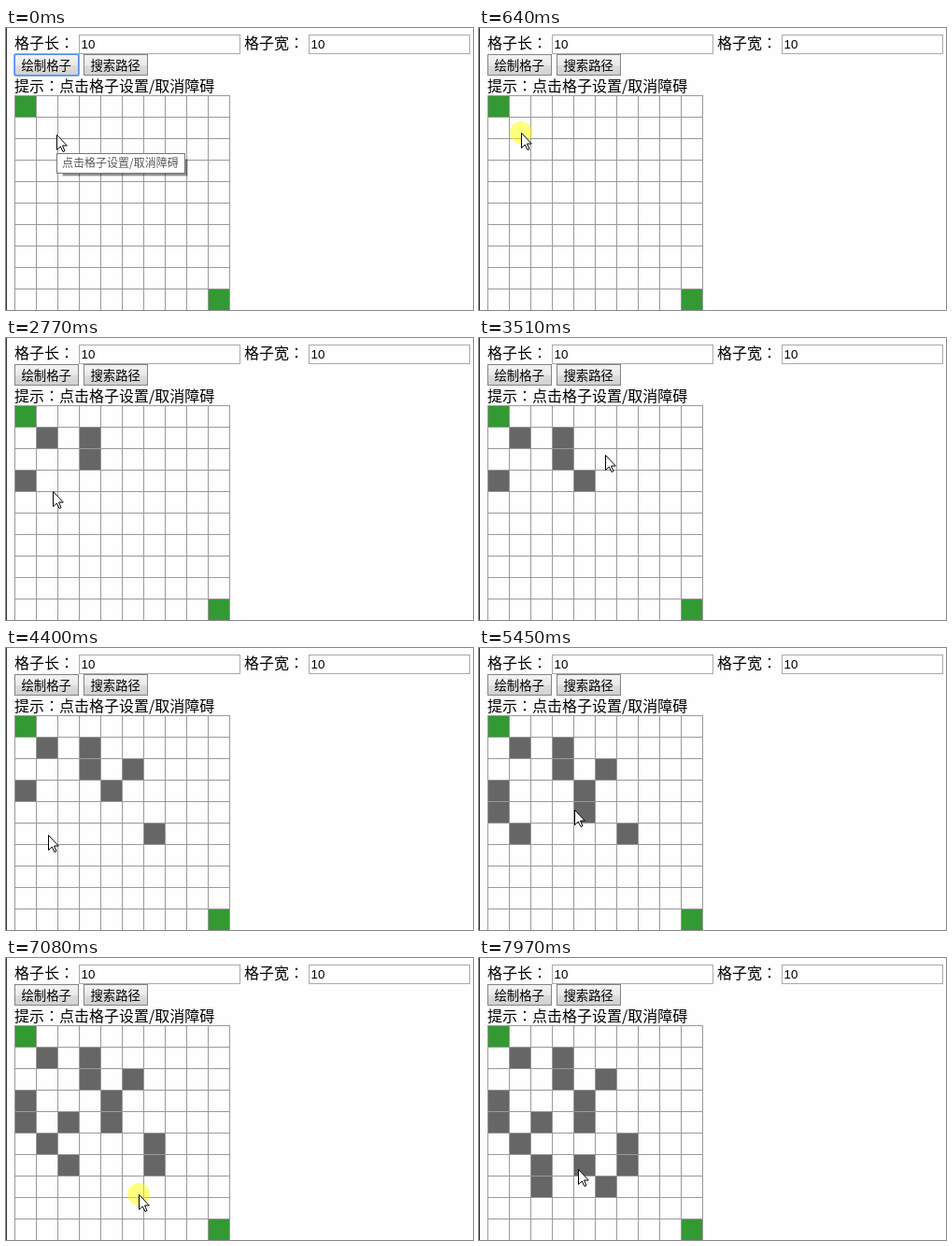
Write an HTML page that moves like this. It is 500 px wide and 302 px high and loops after 8000 ms.

```html
<!DOCTYPE html>
<html lang="zh-CN">
<head>
<meta charset="utf-8">
<title>格子寻路</title>
<style>
  html, body { margin: 0; width: 100%; height: 100%; overflow: hidden; background: #fefefe; }
  svg { display: block; width: 500px; height: 302px; }
  text { font: 16px "Noto Sans CJK SC", "Noto Sans CJK", sans-serif; }
  .colon { font-family: "Noto Sans CJK TC", sans-serif; }
  .value { font: 13.33px "Liberation Sans", Arial, sans-serif; }
  .caption { font-size: 13.33px; }
  .field { fill: #fff; stroke: #a9a9a9; }
  .button { fill: url(#face); stroke: #848484; }
</style>
</head>
<body>
<svg viewBox="0 0 500 302">
  <defs>
    <linearGradient id="face" x2="0" y2="1">
      <stop stop-color="#f3f3f3"/><stop offset=".5" stop-color="#e9e9e9"/>
      <stop offset=".5" stop-color="#dedede"/><stop offset="1" stop-color="#d0d0d0"/>
    </linearGradient>
  </defs>
  <rect width="1" height="302" fill="#333"/>

  <text x="9" y="22">格子长<tspan class="colon" lang="zh-Hant">：</tspan></text>
  <rect class="field" x="78.5" y="7.5" width="172" height="20"/>
  <text class="value" x="80.5" y="22">10</text>
  <text x="255" y="22">格子宽<tspan class="colon" lang="zh-Hant">：</tspan></text>
  <rect class="field" x="324.5" y="7.5" width="172" height="20"/>
  <text class="value" x="326.5" y="22">10</text>

  <rect class="button" x="9.5" y="28.5" width="68" height="22"/>
  <rect id="focus" x="9" y="28" width="69" height="23" rx="2" fill="none" stroke="#4d90fe" stroke-width="2" opacity=".75"/>
  <text class="caption" x="16.5" y="45">绘制格子</text>
  <rect class="button" x="83.5" y="28.5" width="68" height="22"/>
  <text class="caption" x="90.5" y="45">搜索路径</text>
  <text x="9" y="68">提示<tspan class="colon" lang="zh-Hant">：</tspan>点击格子设置/取消障碍</text>

  <g id="cells"></g>
  <path id="lines" fill="none" stroke="#999"/>

  <g id="tooltip">
    <rect x="60" y="140" width="135" height="19" fill="#000" opacity=".18"/>
    <rect x="61" y="141" width="133" height="17" fill="#000" opacity=".3"/>
    <rect x="54.5" y="134.5" width="137" height="21" fill="#fff" stroke="#767676"/>
    <text x="60" y="149" style="font-size:12px" fill="#575757">点击格子设置/取消障碍</text>
  </g>

  <g id="pointer">
    <circle id="halo" r="12" fill="#ff0" opacity=".5"/>
    <path d="M.5 .5V16.5L4.3 13L7 18.5L9 17.6L6.5 12H11.3Z" fill="#fff" stroke="#000"/>
  </g>
</svg>
<script>
  const LOOP = 8000, SIZE = 23, LEFT = 9, TOP = 72, COUNT = 10;
  const REST = 60, HOLD = 90;
  const $ = id => document.getElementById(id);

  // Each click: time of the press and where the pointer is.
  const clicks = [
    [640, 45, 112], [1340, 98, 109], [1700, 93, 127], [2490, 14, 156],
    [3050, 113, 153], [3520, 135, 125], [3900, 158, 199], [4500, 42, 200],
    [4900, 30, 175], [5360, 102, 173], [5750, 67, 176], [6200, 68, 212],
    [6570, 158, 222], [7080, 142, 253], [7640, 67, 245], [7870, 106, 226]
  ].map(([press, x, y]) => ({ x, y, press, time: press - REST, leave: press + HOLD }));

  // The start, and places where the pointer only turns around.
  const turns = [[40, 54, 114], [2770, 50, 164], [4100, 130, 210], [7380, 206, 275]]
    .map(([time, x, y]) => ({ x, y, time, leave: time }));

  const stops = [...clicks, ...turns].sort((a, b) => a.time - b.time);

  function addCell(col, row, color) {
    const cell = document.createElementNS("http://www.w3.org/2000/svg", "rect");
    const box = { x: LEFT + col * SIZE, y: TOP + row * SIZE, width: SIZE, height: SIZE, fill: color };
    for (const name in box) cell.setAttribute(name, box[name]);
    return $("cells").appendChild(cell);
  }

  addCell(0, 0, "#393");
  addCell(COUNT - 1, COUNT - 1, "#393");
  for (const c of clicks)
    c.cell = addCell(Math.floor((c.x - LEFT) / SIZE), Math.floor((c.y - TOP) / SIZE), "#666");

  let grid = "";
  for (let i = 0; i <= COUNT; i++) {
    const step = i * SIZE + 0.5, span = COUNT * SIZE + 1;
    grid += `M${LEFT + step} ${TOP}v${span}M${LEFT} ${TOP + step}h${span}`;
  }
  $("lines").setAttribute("d", grid);

  const clamp = u => Math.max(0, Math.min(1, u));

  // Eased travel to the next stop; short ways take less time.
  function pointerAt(t) {
    const next = stops.findIndex(s => s.time > t);
    if (next === 0) return stops[0];
    if (next < 0) return stops.at(-1);
    const a = stops[next - 1], b = stops[next];
    const dx = b.x - a.x, dy = b.y - a.y;
    const duration = Math.min(b.time - a.leave, 150 + 4 * Math.hypot(dx, dy));
    const u = clamp((t - a.leave) / duration), eased = u * u * (3 - 2 * u);
    return { x: Math.round(a.x + dx * eased), y: Math.round(a.y + dy * eased) };
  }

  const show = (node, on) => node.setAttribute("visibility", on ? "visible" : "hidden");

  function draw(t) {
    const { x, y } = pointerAt(t);
    $("pointer").setAttribute("transform", `translate(${x} ${y})`);
    $("tooltip").setAttribute("opacity", clamp((310 - t) / 270));
    show($("focus"), t < clicks[0].press);
    show($("halo"), clicks.some(c => t >= c.press && t < c.leave));
    for (const c of clicks) show(c.cell, t >= c.leave);
  }

  const start = performance.now();
  function tick() {
    draw((performance.now() - start) % LOOP);
    requestAnimationFrame(tick);
  }
  tick();
</script>
</body>
</html>
```
